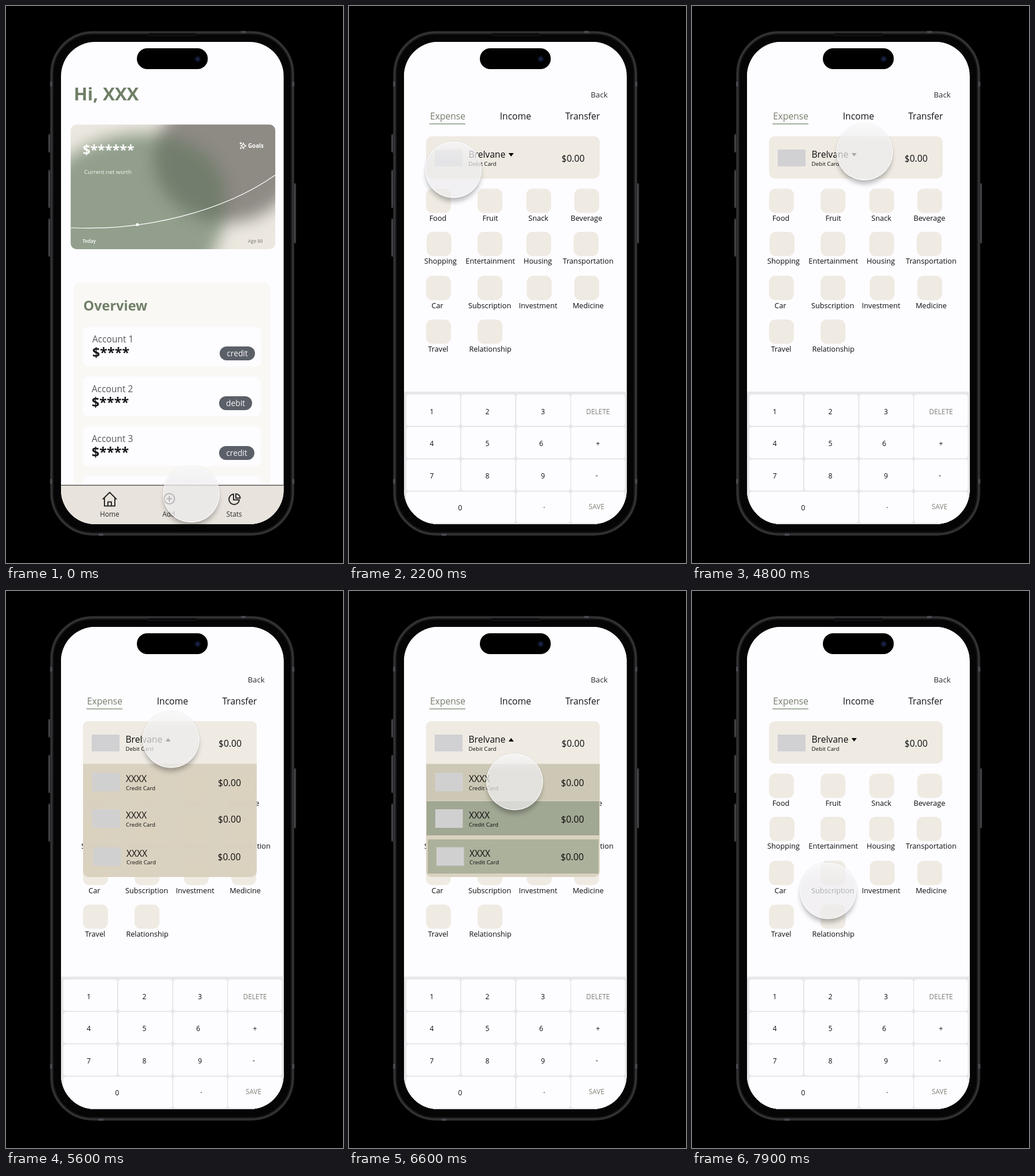
Animation of 582 by 962 pixels, one loop 8000 ms. Source, as an HTML page:

```html
<!DOCTYPE html>
<html lang="en">
<head>
<meta charset="utf-8">
<title>Budget app walkthrough</title>
<style>
html, body { margin: 0; width: 100%; height: 100%; overflow: hidden; background: #000; }
#stage { position: relative; width: 582px; height: 962px; overflow: hidden; background: #000; }
svg { position: absolute; left: 0; top: 0; }
text { font-family: "Open Sans", "Noto Sans", sans-serif; white-space: pre; }
#touch { position: absolute; left: -49px; top: -49px; width: 98px; height: 98px; }
#touch div { position: absolute; inset: 0; border-radius: 50%; box-sizing: border-box; }
#rest {
  background: linear-gradient(rgba(246,246,247,.78), rgba(236,235,237,.72) 35%, rgba(236,235,237,.72));
  border: 1.5px solid rgba(255,255,255,.95);
  box-shadow: 0 8px 8px -2px rgba(0,0,0,.28), 0 0 1px rgba(0,0,0,.4);
}
#press {
  background: rgba(252,251,252,.42);
  border: 1px solid rgba(255,255,255,.7);
  box-shadow: 0 0 1px 0.5px rgba(0,0,0,.25);
}
</style>
</head>
<body>
<div id="stage">
  <svg id="art" width="582" height="962" viewBox="0 0 582 962"></svg>
  <div id="touch"><div id="rest"></div><div id="press"></div></div>
</div>
<script>
const LOOP = 8000;
const PAPER = '#fdfcff', SAND = '#efebe3', SAGE = '#6f7f67';

// ---- drawing helpers ----
const rect = (x, y, w, h, r, fill, extra = '') =>
  `<rect x="${x}" y="${y}" width="${w}" height="${h}" rx="${r}" fill="${fill}" ${extra}/>`;
const text = (x, y, size, str, { fill = '#0c0c0c', w = 400, mid = false } = {}) =>
  `<text x="${x}" y="${y}" font-size="${size}" fill="${fill}" font-weight="${w}"` +
  `${mid ? ' text-anchor="middle"' : ''}>${str}</text>`;
const label = (x, y, str) => text(x, y, 12.7, str, { mid: true });
const tile = (x, y) => rect(x, y, 43, 42, 11, SAND);
const arrow = (x, up) => up
  ? `<path d="M${x - 4.5} 260h9l-4.5 -6z"/>`
  : `<path d="M${x - 4.5} 254h9l-4.5 6z"/>`;

// ---- home page ----
function account(i, kind, pillW) {
  const y = 554 + i * 86, x = i ? 148 : 149, px = i === 0 ? 369 : 368;
  return rect(133, y, i ? 307 : 308, 69, 9, PAPER) +
    text(x, y + 27, 15.5, `Account ${i + 1}`, { fill: '#55565a' }) +
    text(x, y + 53, 23.3, '$****', { w: 700, fill: '#17181a' }) +
    rect(px, y + 34, pillW, 24, 12, '#5b6068') +
    text(px + pillW / 2, y + 51, 13.8, kind, { fill: '#f4f4f6', mid: true });
}

function worthCard() {
  return `<g clip-path="url(#card)">${rect(111, 204, 355, 217, 0, '#ece8e0')}
    <g filter="url(#soft)">
      <ellipse cx="380" cy="262" rx="125" ry="112" fill="#8e8a84"/>
      <rect x="300" y="165" width="230" height="150" fill="#8e8a84"/>
      <path d="M70 300C130 215 260 200 330 243C405 290 390 375 340 460H70z" fill="#657861" fill-opacity=".66"/>
    </g>
    <path d="M112 383C240 389 375 355 465 292" fill="none" stroke="#fff" stroke-width="1.2"/>
    <circle cx="227" cy="377.5" r="2.6" fill="#fff"/></g>
    <g fill="none" stroke="#fff" stroke-width="1.3" stroke-linejoin="round">
      <path d="M410 236.5q.8 4 4.5 5q-3.7 1-4.5 5q-.8-4-4.5-5q3.7-1 4.5-5z"/>
      <path d="M405.5 235v4M403.5 237h4M405.5 244v3M404 245.5h3"/>
    </g>` +
    text(418, 245, 9.8, 'Goals', { w: 700, fill: '#fff' }) +
    text(132.5, 257, 23.2, '$******', { w: 700, fill: '#fff' }) +
    text(135, 290, 9.8, 'Current net worth', { fill: '#f7f7f5' }) +
    text(132, 408.5, 8.1, 'Today', { w: 600, fill: '#fff' }) +
    text(418, 408.5, 8, 'Age 80', { w: 600, fill: '#928f8a' });
}

function tabBar() {
  const name = (x, s) => text(x, 882, 11.8, s, { fill: '#2b2b2b', mid: true });
  return rect(95, 828, 385, 70, 0, '#e8e3dc') + rect(95, 827, 385, 1.3, 0, '#4c4846') +
    `<g fill="none" stroke="#2b2b2b" stroke-width="2" stroke-linejoin="round" stroke-linecap="round">
      <path d="M167.5 851.5L179 840L190.5 851.5M170 849.5V863.5H188V849.5M176 863.5V856.5H182V863.5"/>
      <circle cx="282" cy="851" r="9"/><path d="M278 851h8M282 847v8"/>
      <path d="M393 843a9 9 0 1 0 10 10h-10z"/>
      <path d="M397 842.5a8 8 0 0 1 7.5 7.5h-7.5z"/>
    </g>` + name(179, 'Home') + name(281, 'Add') + name(394, 'Stats');
}

const home = () => rect(95, 62, 385, 834, 0, PAPER) +
  text(117, 163, 31, 'Hi, XXX', { w: 700, fill: SAGE }) + worthCard() +
  rect(117, 478, 339, 420, 10, '#f9f8f5') +
  text(133.5, 526, 23.5, 'Overview', { w: 700, fill: SAGE }) +
  account(0, 'credit', 61) + account(1, 'debit', 57) + account(2, 'credit', 61) +
  rect(133, 812, 307, 60, 9, PAPER) + tabBar();

// ---- entry pages ----
function tabs(active) {
  return [['Expense', 170.5, 139, 62], ['Income', 287.5, 256, 63], ['Transfer', 403.5, 372, 62]]
    .map(([s, x, ux, uw], i) =>
      text(x, 196, 15.6, s, { mid: true, fill: i === active ? '#747d69' : '#141416' }) +
      (i === active ? rect(ux, 203, uw, 1.2, 0, '#6f8267') : '')).join('');
}

function source(name, arrowX, up) {
  return rect(148, 248, 48, 29, 0, '#d1d0d3') +
    text(206.5, 262, 15.6, name) + text(206.5, 275.5, 9.7, 'Debit Card') +
    text(367, 268.5, 15.6, '$0.00') + arrow(arrowX, up);
}

function keypad() {
  let s = rect(95, 666, 385, 230, 0, '#e7e6e9');
  const cols = [99, 194, 289, 383.5];
  for (let r = 0; r < 4; r++) {
    for (let c = 0; c < 4; c++) {
      if (r === 3 && c === 1) continue;
      s += rect(cols[c], 671 + r * 56, r === 3 && c === 0 ? 188 : 93, 54, 4.5, PAPER);
    }
  }
  const key = (x, y, k) => text(x, y, 12, k, { mid: true });
  [['1', '2', '3'], ['4', '5', '6'], ['7', '8', '9']].forEach((row, r) =>
    row.forEach((k, c) => {
      s += key(k === '6' ? 332 : 143 + c * 96, [704.5, 759.5, 815.5][r], k);
    }));
  const grey = { mid: true, fill: '#7f8177' };
  return s + key(192, 871, '0') + key(337, 867, '.') + key(430, 759.5, '+') + key(428, 815, '-') +
    text(430, 704.5, 11.8, 'DELETE', grey) + text(427.5, 868.5, 11.7, 'SAVE', grey);
}

function expense() {
  const rows = [
    [315.5, 371, [133, 222, 306, 389], ['Food', 153.5], ['Fruit', 244], ['Snack', 327], ['Beverage', 410]],
    [390, 445, [134, 222, 306, 388], ['Shopping', 158], ['Entertainment', 244], ['Housing', 326], ['Transportation', 413]],
    [466, 521.5, [133, 222, 307, 389], ['Car', 152.5], ['Subscription', 243], ['Investment', 326.5], ['Medicine', 413]],
    [541.5, 597, [133, 222], ['Travel', 154], ['Relationship', 244]]
  ];
  return rect(95, 62, 385, 834, 0, PAPER) +
    text(417.5, 158, 13.3, 'Back', { fill: '#2a2a2c' }) +
    tabs(0) + rect(133, 225, 300, 73, 10, SAND) + source('Brelvane', 280, false) +
    rows.map(([ty, ly, xs, ...names]) =>
      xs.map(x => tile(x, ty)).join('') + names.map(([s, x]) => label(x, ly, s)).join('')).join('') +
    keypad();
}

function income() {
  return rect(95, 166, 385, 496, 0, PAPER) + tabs(1) +
    rect(133, 225, 300, 73, 10, SAND) + source('Saving', 263, false) +
    [133, 219, 305, 391].map(x => tile(x, 315.5)).join('') + tile(133, 396) + tile(219, 396) +
    label(156.5, 371, 'Salary') + label(240, 371, 'Living Expense') +
    label(328, 371, 'Bonus') + label(412, 371, 'Management') +
    label(154, 451, 'Investment') + label(154, 469, 'Income') + label(242, 450.5, 'Extra Gains');
}

function dropdown() {
  const rows = [[134, 299, 299, 63, 149, 331], [134, 363, 298, 59, 149, 394], [136, 429, 295, 59, 151, 459.5]];
  return rect(133, 225, 300, 269, 10, '#dad2bf') +
    `<path d="M133 298.5V235a10 10 0 0 1 10-10H423a10 10 0 0 1 10 10V298.5z" fill="${SAND}"/>` +
    source('Brelvane', 280, true) +
    rows.map(([x, y, w, h, cx, my], i) =>
      rect(x, y, w, h, 0, '#a0a793', `id="hot${i}"`) +
      rect(cx, my - 17, 47.5, 32, 0, '#d1d0d1') +
      text(i === 2 ? 208 : 207, my - 1, 15.6, 'XXXX') +
      text(i === 2 ? 208 : 207, my + 12.5, 9.7, 'Credit Card') +
      text(i === 2 ? 365.5 : 366, my + 5.5, 15.6, '$0.00')).join('');
}

// ---- handset ----
function handset() {
  const side = (x, y, h) => rect(x, y, 4, h, 1.5, '#333336') + rect(x + 1, y + 2, 1, h - 4, 0.5, '#555559');
  const mark = (x, y, w, h) => rect(x, y, w, h, 0, '#48484c');
  return side(73, 221, 32) + side(73, 283, 66) + side(73, 367, 66) + side(497, 306, 104) +
    rect(78.5, 45.5, 417, 867, 71, '#050506', 'stroke="#343437" stroke-width="4"') +
    rect(77, 44, 420, 870, 72.5, 'none', 'stroke="#242426" stroke-width="1"') +
    rect(81.5, 48.5, 411, 861, 68, 'none', 'stroke="#1a1a1c" stroke-width="1.5"') +
    mark(406, 43, 8, 4) + mark(160, 911, 8, 4) +
    [131, 817].map(y => mark(76, y, 4, 8) + mark(494, y, 4, 8)).join('') +
    rect(245, 47, 85, 4, 2, '#09090a', 'stroke="#1d1d20" stroke-width="1"');
}

const art = document.getElementById('art');
art.innerHTML = `<defs>
  <clipPath id="screen"><rect x="95" y="62" width="384.5" height="833" rx="59"/></clipPath>
  <clipPath id="card"><rect x="111.7" y="204.7" width="353.3" height="215.3" rx="10"/></clipPath>
  <filter id="soft" x="-30%" y="-30%" width="160%" height="160%"><feGaussianBlur stdDeviation="14"/></filter>
  <radialGradient id="lens"><stop offset="0" stop-color="#2a3566"/><stop offset=".5" stop-color="#10142c"/><stop offset="1" stop-color="#06070d"/></radialGradient>
  </defs>` + handset() +
  `<g clip-path="url(#screen)"><g>${home()}</g><g id="expense">${expense()}</g>` +
  `<g id="income">${income()}</g><g id="dropdown">${dropdown()}</g></g>` +
  rect(226, 73, 122.5, 36, 18, '#000') + '<circle cx="331" cy="91.5" r="6" fill="url(#lens)"/>';

// ---- motion ----
const path = [
  [0, 320, 843], [400, 296, 851], [800, 284, 858], [1100, 284, 858],
  [1800, 205, 400], [2100, 160, 300], [2500, 288, 190], [2900, 290, 190],
  [3400, 402, 187], [3700, 402, 187], [4200, 170, 185], [4500, 170, 185],
  [4800, 298, 252], [5000, 285, 256.5], [5650, 285, 256.5],
  [6150, 287, 530], [6300, 287, 540], [6600, 286, 329.5], [6900, 285, 257],
  [7250, 285, 257], [7850, 235, 517.5], [8000, 235, 517.5]
];
const taps = [930, 2620, 3500, 4380, 5420, 7150];
const hover = [
  [[5720, 5850], [6560, 6830]],
  [[5850, 5980], [6350, 6680]],
  [[5980, 6130], [6200, 6560]]
];

const clamp = v => Math.max(0, Math.min(1, v));
const ease = k => k * k * (3 - 2 * k);
const ramp = (t, a, b) => clamp((t - a) / (b - a));
const span = (t, on, off, d) => ramp(t, on, on + d) * (1 - ramp(t, off, off + d));

function place(t) {
  let i = 1;
  while (i < path.length - 1 && path[i][0] < t) i++;
  const [t0, x0, y0] = path[i - 1], [t1, x1, y1] = path[i];
  const k = ease(ramp(t, t0, t1));
  return [x0 + (x1 - x0) * k, y0 + (y1 - y0) * k];
}

const el = id => document.getElementById(id);
const touch = el('touch'), rest = el('rest'), press = el('press');
const pages = ['expense', 'income', 'dropdown'].map(el);
const hot = [0, 1, 2].map(i => el('hot' + i));

function draw(t) {
  const levels = [ramp(t, 870, 1070), span(t, 2620, 4400, 230), span(t, 5400, 7150, 204)];
  pages.forEach((p, i) => {
    p.style.opacity = levels[i];
    p.style.visibility = levels[i] ? 'visible' : 'hidden';
  });
  hot.forEach((h, i) => {
    h.style.opacity = Math.max(...hover[i].map(([on, off]) => span(t, on, off, 180)));
  });
  const [x, y] = place(t);
  touch.style.transform = `translate(${x}px, ${y}px)`;
  const down = Math.max(...taps.map(p => clamp(1.6 - Math.abs(t - p) / 90)));
  rest.style.opacity = 1 - down;
  press.style.opacity = down;
}

const start = performance.now();
function tick() {
  draw((performance.now() - start) % LOOP);
  requestAnimationFrame(tick);
}
draw(0);
requestAnimationFrame(tick);
</script>
</body>
</html>
```
